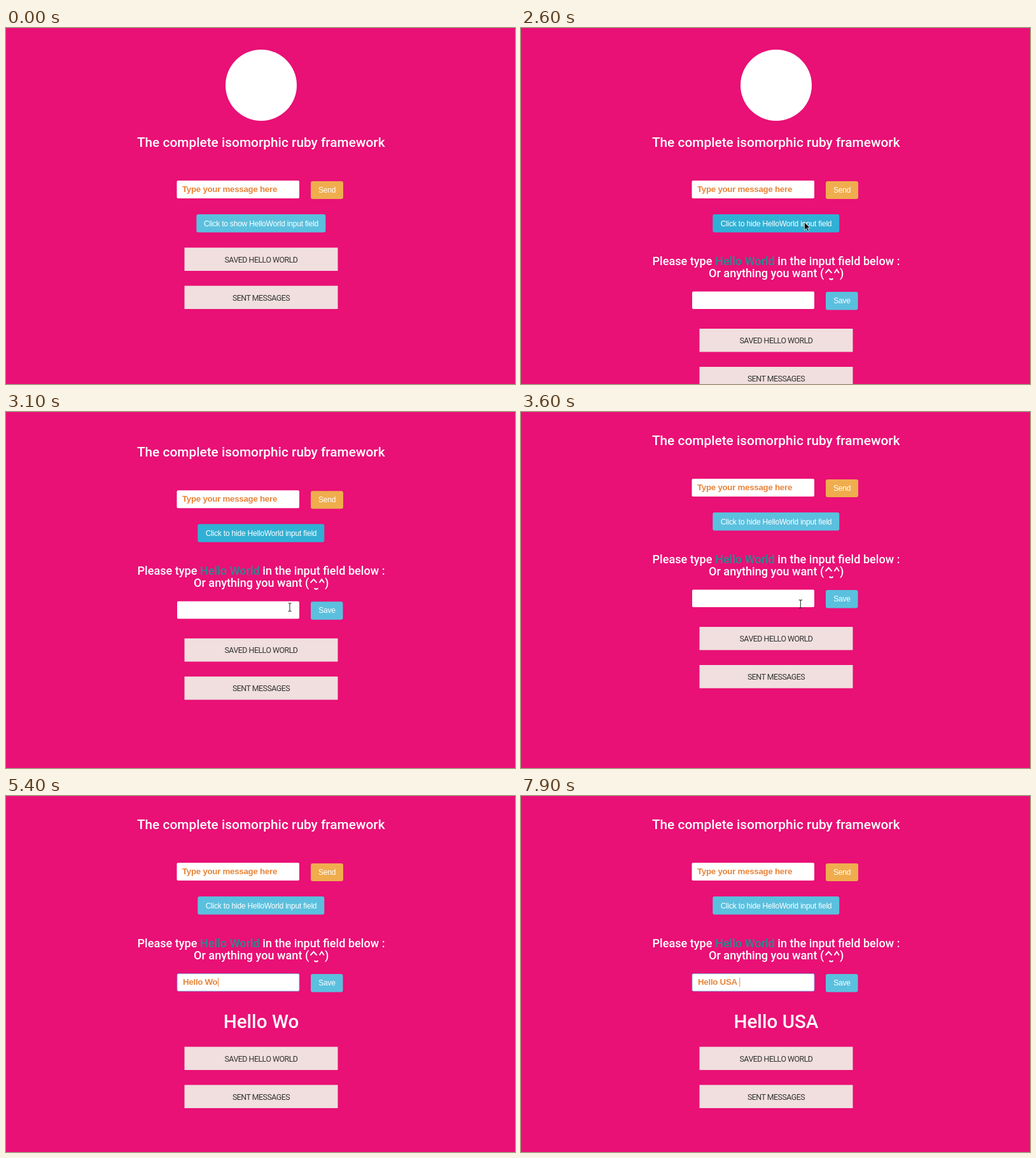
An HTML page that plays this animation: 800 by 560 pixels, repeating every 8000 ms.

```html
<!DOCTYPE html>
<html lang="en">
<head>
<meta charset="utf-8">
<title>Isomorphic ruby demo</title>
<style>
  html, body { margin: 0; width: 100%; height: 100%; overflow: hidden; background: #e91076; }
  svg { display: block; width: 800px; height: 560px; }
  text { white-space: pre; }
  .ui { font: 500 18.1px Roboto, "Noto Sans", sans-serif; fill: #fff; }
  .title { font-size: 20.85px; }
  .echo { font-size: 29.6px; }
  .mid { text-anchor: middle; }
  .field { fill: #fff; }
  .focus { stroke: #66afe9; stroke-width: .8; }
  .entry { font: bold 13.3px "Liberation Sans", Arial, sans-serif; letter-spacing: -.27px; fill: #e8853a; }
  .label { font: 12px "Liberation Sans", Arial, sans-serif; letter-spacing: -.2px; fill: #fff; text-anchor: middle; }
  .panel rect { fill: #f0dfde; }
  .panel text { font: 400 12.4px Roboto, "Noto Sans", sans-serif; letter-spacing: -.5px; fill: #333; text-anchor: middle; }
  .blue { fill: #5bc0de; }
  .hover { fill: #31b0d5; }
  .face { fill: none; stroke: #fff; stroke-width: 1.9; }
</style>
</head>
<body>
<svg viewBox="0 0 800 560">
  <clipPath id="view"><rect y="32" width="800" height="528"/></clipPath>
  <rect width="800" height="560" fill="#e91076"/>
  <g clip-path="url(#view)">
    <g id="page">
      <circle cx="401" cy="90" r="56" fill="#fff"/>
      <text class="ui title mid" x="400.7" y="187">The complete isomorphic ruby framework</text>

      <rect class="field" x="268.5" y="240" width="192.5" height="28" rx="2"/>
      <text class="entry" x="277" y="258">Type your message here</text>
      <rect x="479" y="241" width="51" height="28" rx="3" fill="#f0ad4e"/>
      <text class="label" x="504.5" y="258.5">Send</text>

      <rect id="toggle" y="293" height="28.5" rx="3"/>
      <text id="toggleText" class="label" x="401" y="311.5"></text>

      <g id="form">
        <text class="ui mid" x="401" y="373">Please type <tspan fill="#2b8a8f">Hello World</tspan> in the input field below :</text>
        <text class="ui" x="295" y="392">Or anything you want (</text>
        <path class="face" d="M478.5 385.5l5-5.5 5 5.5M484.5 394q3 3 6 0M492.5 385.5l3.7-5.5 3.7 5.5"/>
        <text class="ui" x="501" y="392">)</text>
        <rect id="field" x="269" y="414.5" width="192" height="27.5" rx="2"/>
        <text id="typed" class="entry" x="278" y="432"></text>
        <rect id="caret" y="421" width="1" height="14" fill="#e8853a"/>
        <rect class="blue" x="479" y="415" width="50.5" height="28.5" rx="3"/>
        <text class="label" x="504.5" y="433">Save</text>
        <text id="echo" class="ui echo mid" x="401" y="499.5"></text>
      </g>

      <g id="panels" class="panel">
        <rect x="280.5" y="345.5" width="241" height="36.5"/>
        <text x="401" y="368.5">SAVED HELLO WORLD</text>
        <rect x="280.5" y="405.5" width="241" height="36.5"/>
        <text x="401" y="428.5">SENT MESSAGES</text>
      </g>
    </g>
  </g>
  <path id="arrow" d="M0 0V12.5L2.9 9.8 4.8 14.2 6.9 13.3 5 9H8.8Z" fill="#111" stroke="#fff" stroke-width=".7"/>
  <path id="beam" d="M-2.5-6.5Q0-6.5 0-5Q0-6.5 2.5-6.5M0-5V5M-2.5 6.5Q0 6.5 0 5Q0 6.5 2.5 6.5" fill="none" stroke="#333" stroke-width="1.1"/>
</svg>
<script>
const LOOP = 8000, STEP = 100;
const CLICK = 2300, SCROLL = 2700, FOCUS = 4000, TYPE = 4700, ERASE = 5900, RETYPE = 6900;

const $ = id => document.getElementById(id);
const progress = (t, from, to) => Math.min(1, Math.max(0, (t - from) / (to - from)));
const easeOut = p => 1 - (1 - p) ** 3;
const mix = (a, b, p) => a + (b - a) * p;
const show = (id, on) => $(id).setAttribute("visibility", on ? "visible" : "hidden");
const move = (id, x, y) => $(id).setAttribute("transform", `translate(${x} ${y})`);

// Number of key presses made so far at a steady pace
const keys = (t, start, pace) => t < start ? 0 : Math.floor((t - start) / pace) + 1;

function typedAt(t) {
  const first = "Hello World".slice(0, keys(t, TYPE, 90));
  const kept = first.slice(0, Math.max(6, 11 - keys(t, ERASE, 130)));
  return kept + "USA ".slice(0, keys(t, RETYPE, 270));
}

function drawPage(t) {
  const open = t >= CLICK, text = open ? typedAt(t) : "";
  move("page", 0, -135 * easeOut(progress(t, SCROLL, 3520)));
  move("panels", 0, (open ? 127.5 : 0) + (text ? 56.5 : 0));
  $("form").style.display = open ? "" : "none";

  const width = open ? 199 : 203;
  $("toggle").setAttribute("x", 400.8 - width / 2);
  $("toggle").setAttribute("width", width);
  $("toggle").setAttribute("class", t >= 2000 && t < 3300 ? "hover" : "blue");
  $("toggleText").textContent = `Click to ${open ? "hide" : "show"} HelloWorld input field`;

  const focused = t >= FOCUS;
  $("field").setAttribute("class", focused ? "field focus" : "field");
  $("typed").textContent = text;
  $("echo").textContent = text.trim();
  $("caret").setAttribute("x", 278.5 + (text ? $("typed").getComputedTextLength() : 0));
  show("caret", focused && (text || t < FOCUS + 500));
}

function drawPointer(t) {
  const enter = easeOut(progress(t, 1400, 2100));
  const drift = easeOut(progress(t, 3500, 3900));
  move("arrow", mix(680, 445.5, enter), mix(400, 305.5, enter));
  move("beam", mix(446, 434.5, drift), mix(307, 298.5, drift));
  show("arrow", t >= 1400 && t < 3000);
  show("beam", t >= 3000 && t < TYPE);
}

function frame(now) {
  const t = Math.floor(now % LOOP / STEP) * STEP;
  drawPage(t);
  drawPointer(t);
  requestAnimationFrame(frame);
}
frame(0);
</script>
</body>
</html>
```
